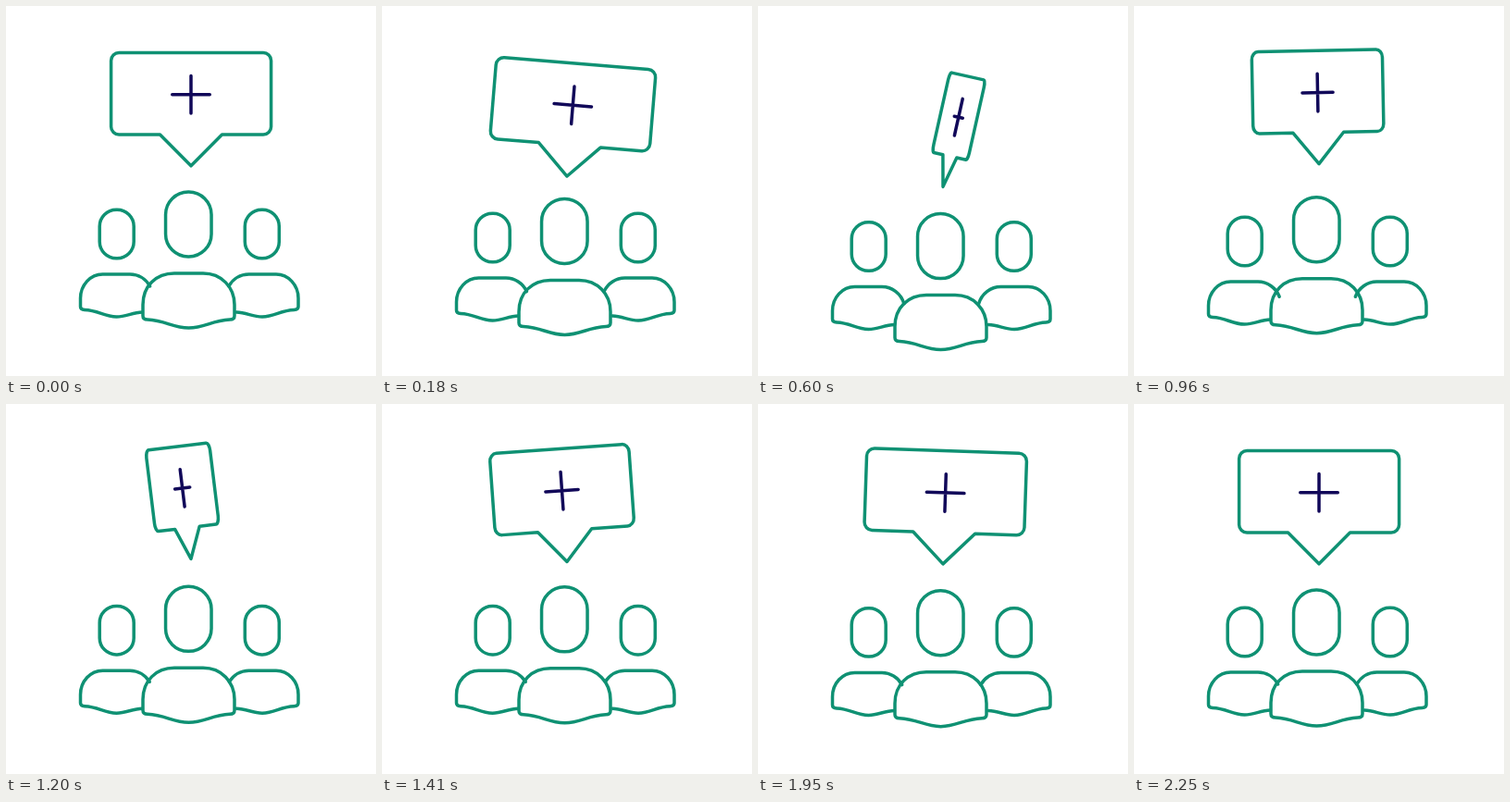
An HTML page with a canvas that plays this animation: 400 px wide and 400 px high, repeating every 2440 ms.

```html
<!DOCTYPE html>
<html lang="en">
<head>
<meta charset="utf-8">
<title>Group message</title>
<style>
  html, body { margin: 0; width: 100%; height: 100%; overflow: hidden; background: #fff; }
  canvas { display: block; width: 400px; height: 400px; }
</style>
</head>
<body>
<canvas id="stage" width="400" height="400"></canvas>
<script>
const ctx = document.getElementById('stage').getContext('2d');
const LOOP = 2440, STEP = 30, LAST = 2250;
const GREEN = '#0f9173', NAVY = '#110859';

// Tracks are lists of [time, value].
const centreY = [[0, 0], [500, 25], [1250, -4], [1850, 0.8], [2190, 0]];
const sideY = [[0, 0], [500, 13.5], [770, 13.5], [1250, -2.3], [1850, 0.5], [2190, 0]];
const bubbleY = [[0, 0], [420, 28.5], [1100, -6], [1650, 0.2], [2190, 0]];
const tilt = [[0, 0], [470, 14.3], [1220, -7], [1750, 2.9], [2270, 0]];
const spin = [[0, 0], [390, 21], [600, 76.8], [960, 215.3], [1200, 293.6], [1650, 350], [2000, 360]];

const rad = deg => deg * Math.PI / 180;

function segment(track, t) {
  let i = 0;
  while (i < track.length - 2 && t > track[i + 1][0]) i++;
  const [t0, v0] = track[i], [t1, v1] = track[i + 1];
  return { i, v0, v1, span: t1 - t0, p: Math.min(1, (t - t0) / (t1 - t0)) };
}

function eased(track, t) {
  const { v0, v1, p } = segment(track, t);
  return v0 + (v1 - v0) * p * p * (3 - 2 * p);
}

function slopeAt(track, i) {
  if (i === 0 || i === track.length - 1) return 0;
  const [a, b, c] = [track[i - 1], track[i], track[i + 1]];
  const h0 = b[0] - a[0], h1 = c[0] - b[0];
  return ((b[1] - a[1]) / h0 * h1 + (c[1] - b[1]) / h1 * h0) / (h0 + h1);
}

// Cubic Hermite curve through all points.
function flowing(track, t) {
  const { i, v0, v1, span, p } = segment(track, t);
  const q = 1 - p;
  return v0 * q * q * (1 + 2 * p) + v1 * p * p * (3 - 2 * p)
    + span * p * q * (slopeAt(track, i) * q - slopeAt(track, i + 1) * p);
}

function stroke(color) {
  ctx.strokeStyle = color;
  ctx.stroke();
}

function head(x, top, bottom, w, r) {
  ctx.beginPath();
  ctx.roundRect(x - w / 2, top, w, bottom - top, r);
  stroke(GREEN);
}

function centrePerson(dy) {
  ctx.save();
  ctx.translate(0, dy);
  head(197.3, 201, 271, 49.5, 24.5);
  ctx.beginPath();
  ctx.moveTo(148, 323);
  ctx.bezierCurveTo(148, 303, 162, 289, 182, 289);
  ctx.lineTo(213, 289);
  ctx.bezierCurveTo(233, 289, 247, 304, 247, 323);
  ctx.lineTo(247, 335);
  ctx.quadraticCurveTo(247, 339, 242, 339);
  ctx.bezierCurveTo(222, 340, 215, 348, 197.5, 348);
  ctx.bezierCurveTo(180, 348, 173, 340, 153, 339);
  ctx.quadraticCurveTo(148, 339, 148, 335);
  ctx.closePath();
  stroke(GREEN);
  ctx.restore();
}

function sidePerson(dy, mirrored) {
  ctx.save();
  if (mirrored) {
    ctx.translate(396.5, 0);
    ctx.scale(-1, 1);
  }
  ctx.translate(0, dy);
  head(119.7, 220.3, 272.7, 37, 18);
  // The inner shoulder lengthens as the figure sinks.
  const shoulderEnd = Math.asin((303 + 0.4 * dy - 316) / 26);
  ctx.beginPath();
  ctx.ellipse(134, 316, 25, 26, 0, shoulderEnd, -Math.PI / 2, true);
  ctx.ellipse(104.5, 316, 24, 26, 0, -Math.PI / 2, -Math.PI, true);
  ctx.lineTo(80.5, 325);
  ctx.quadraticCurveTo(80.5, 328.3, 85, 328.5);
  ctx.bezierCurveTo(100, 329, 106, 336, 119.5, 336);
  ctx.bezierCurveTo(130, 336, 136, 331.5, 147.5, 331);
  stroke(GREEN);
  ctx.restore();
}

function bubblePath() {
  const left = -86.4, right = 86.6, top = -122.3, bottom = -33.8, tail = 33.5, r = 8.5;
  ctx.moveTo(0, 0);
  ctx.lineTo(-tail, bottom);
  ctx.arcTo(left, bottom, left, top, r);
  ctx.arcTo(left, top, right, top, r);
  ctx.arcTo(right, top, right, bottom, r);
  ctx.arcTo(right, bottom, tail, bottom, r);
  ctx.lineTo(tail, bottom);
  ctx.closePath();
}

function plusPath() {
  ctx.moveTo(-20.3, -77);
  ctx.lineTo(20.3, -77);
  ctx.moveTo(0, -97.3);
  ctx.lineTo(0, -56.7);
}

// Squeezes the outline but keeps an even line weight.
function squeezed(path, scaleX, color) {
  ctx.beginPath();
  ctx.save();
  ctx.scale(scaleX, 1);
  path();
  ctx.restore();
  stroke(color);
}

function bubble(t) {
  const turn = Math.abs(Math.cos(rad(flowing(spin, t))));
  const scaleX = Math.max(0.001, turn);
  ctx.save();
  ctx.translate(200, 172.8 + eased(bubbleY, t));
  ctx.rotate(rad(eased(tilt, t)));
  squeezed(bubblePath, scaleX, GREEN);
  squeezed(plusPath, scaleX, NAVY);
  ctx.restore();
}

function draw(t) {
  ctx.fillStyle = '#fff';
  ctx.fillRect(0, 0, 400, 400);
  ctx.lineWidth = 3.5;
  ctx.lineCap = ctx.lineJoin = 'round';
  const dy = eased(sideY, t);
  sidePerson(dy, false);
  sidePerson(dy, true);
  centrePerson(eased(centreY, t));
  bubble(t);
}

const start = performance.now();
function tick() {
  const t = (performance.now() - start) % LOOP;
  draw(Math.min(LAST, Math.floor(t / STEP) * STEP));
  requestAnimationFrame(tick);
}
tick();
</script>
</body>
</html>
```
